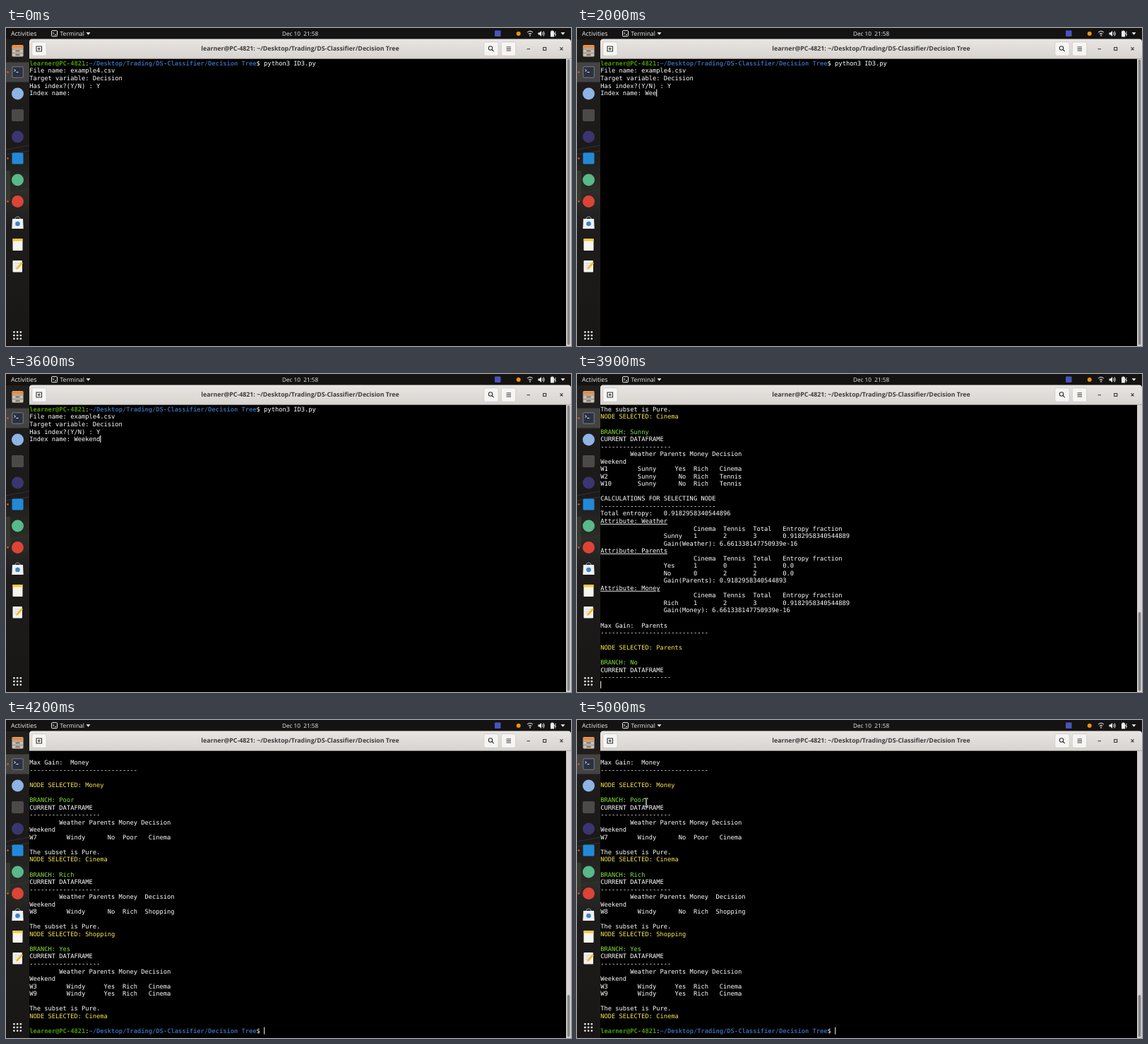
An HTML page for the animation above (5100 ms loop, 800 by 450 pixels).

```html
<!DOCTYPE html>
<html lang="en">
<head>
<meta charset="utf-8">
<title>Terminal session</title>
<style>
  html, body { margin: 0; width: 100%; height: 100%; overflow: hidden; background: #000; }
  svg { display: block; width: 800px; height: 450px; }
  text { text-rendering: geometricPrecision; white-space: pre; }
  .ui { font: 8.5px "Open Sans", "Noto Sans", sans-serif; fill: #eee; }
  .activities { font-size: 8.9px; }
  .clock { font-size: 8.2px; }
  .title { font-size: 8.8px; font-weight: 700; fill: #3d3d3d; text-anchor: middle; }
  .screen { font: 8.755px "DejaVu Sans Mono", monospace; fill: #fff; }
  .user { fill: #4e9a06; font-weight: 700; }
  .path { fill: #3465a4; font-weight: 700; }
  .node { fill: #fce94f; }
  .branch { fill: #8ae234; }
  .attribute { text-decoration: underline; }
  .button { fill: #f6f5f3; stroke: #cbc5bf; stroke-width: .7; }
  .line { fill: none; stroke: #333; stroke-width: 1.1; }
  .light { fill: none; stroke: #eee; stroke-width: 1; }
</style>
</head>
<body>
<svg viewBox="0 0 800 450" xmlns="http://www.w3.org/2000/svg">
  <defs>
    <linearGradient id="bar" x2="0" y2="1">
      <stop stop-color="#e8e5e2"/><stop offset="1" stop-color="#d8d4d0"/>
    </linearGradient>
    <linearGradient id="dock" x2="0" y2="1">
      <stop stop-color="#211f1e"/><stop offset=".35" stop-color="#1b1a19"/>
      <stop offset=".5" stop-color="#2c2c28"/><stop offset=".62" stop-color="#1d1c1b"/>
      <stop offset="1" stop-color="#181716"/>
    </linearGradient>
  </defs>
  <rect width="800" height="450"/>

  <g id="dockbar">
    <rect y="15.500" width="33" height="434.500" fill="url(#dock)"/>
    <path d="M0 172L33 166M0 179L33 174M0 236L33 228" stroke="#33322f" fill="none"/>
    <path d="M0 202h6v43H0z" fill="#35372d"/>
    <rect y="48.500" width="33" height="28" fill="#454341"/>
    <g id="running" fill="#e95420">
      <circle cx="2.500" cy="62.500" r="1.300"/><circle cx="2.500" cy="184.500" r="1.300"/><circle cx="2.500" cy="245.500" r="1.300"/>
    </g>
    <rect x="8.500" y="24" width="16" height="16.500" rx="1.500" fill="#c9c0b4"/>
    <path d="M9 24.500h15l.5 4h-16z" fill="#e98a3c"/>
    <path d="M9 30h15M9 35.500h15" stroke="#81776c" stroke-width=".8"/>
    <path d="M13.500 32.500h6M13.500 38h6" stroke="#5f574f" stroke-width="1.300"/>
    <rect x="8.800" y="54.800" width="15.400" height="15.400" rx="1.200" fill="#293142" stroke="#8b9098" stroke-width=".8"/>
    <path d="M11.500 58.500l2 1.500-2 1.500M14.500 62.500h3" class="light"/>
    <circle cx="16.500" cy="93" r="8.500" fill="#8fb4e3"/>
    <rect x="8" y="115" width="17" height="17" rx="2" fill="#4c4a48"/>
    <circle cx="16.500" cy="154" r="8.500" fill="#3b3570"/>
    <rect x="8.500" y="176.500" width="16" height="16" rx="1.500" fill="#2389d7"/>
    <circle cx="16.500" cy="215" r="8.500" fill="#58b98a"/>
    <circle cx="16.500" cy="245.500" r="8.500" fill="#db4437"/>
    <path d="M13 271v-2q3.500-4 7 0v2" fill="none" stroke="#8aa9c8"/>
    <path d="M9 270h15l.7 14H8.300z" fill="#edf0f3"/>
    <circle cx="16.500" cy="277" r="3.300" fill="#3f83c5"/>
    <rect x="9.500" y="298" width="14" height="17" rx="1" fill="#f7f5ed"/>
    <path d="M9.500 298h14v3.500h-14z" fill="#f3c83d"/>
    <rect x="9.500" y="329" width="13.500" height="16.500" rx="1" fill="#f4f3ef"/>
    <path d="M12 333h8M12 336h7M12 339h5" stroke="#bbb" stroke-width=".7"/>
    <path d="M14 342l1-3 7-8 2 2-7 8z" fill="#efbd2c"/>
    <g id="apps" fill="#eee"></g>
  </g>

  <g id="topbar">
    <rect width="800" height="15.700" fill="#151312"/>
    <g class="ui">
      <text class="activities" x="7" y="11">Activities</text>
      <text x="76.500" y="11">Terminal</text>
      <text class="clock" x="391" y="11">Dec 10  21:58</text>
    </g>
    <rect x="64.500" y="3.700" width="8" height="8" rx="1" class="light"/>
    <path d="M66.300 6l1.500 1.500-1.500 1.500M69 9.500h2" class="light"/>
    <path d="M113.500 6.300h6l-3 3.500zM785.500 6.300h6l-3 3.500z" fill="#eee"/>
    <rect x="692" y="3.500" width="8.500" height="8.500" rx="1" fill="#4b53bc"/>
    <circle cx="725.700" cy="8" r="3" fill="#f5900c"/>
    <path d="M738 6.200q4-3.600 8 0M739.700 8.300q2.300-2 4.600 0M742 8.500v3.500" class="light"/>
    <path d="M753.500 6.500h2l2.500-2.500v8l-2.500-2.500h-2z" fill="#eee"/>
    <path d="M759.500 6q1.500 2 0 4M761 4.500q2.500 3.500 0 7" class="light"/>
    <path d="M771 4.500h1.500v-1h2v1h1.500v8h-5z" fill="#eee"/>
    <path d="M778.500 5l-2 3.500h2l-1 3" class="light"/>
  </g>

  <g id="titlebar">
    <path d="M33 43.500V19.500q0-4 4-4h759q4 0 4 4v24z" fill="url(#bar)"/>
    <path d="M33 43.200h767" stroke="#b9b3ad" stroke-width=".7"/>
    <text class="ui title" x="416.500" y="32.300">learner@PC-4821: ~/Desktop/Trading/DS-Classifier/Decision Tree</text>
    <rect class="button" x="36.800" y="19.700" width="20.400" height="19.600" rx="2.500"/>
    <rect class="button" x="676.800" y="19.700" width="20.400" height="19.600" rx="2.500"/>
    <rect class="button" x="701.300" y="19.700" width="20.400" height="19.600" rx="2.500"/>
    <path class="line" d="M43 26h7.500v7H43zM46.700 27.500v4M44.700 29.500h4M708.500 27h6.500M708.500 29.500h6.500M708.500 32h6.500"/>
    <circle class="line" cx="686" cy="28.500" r="2.700"/>
    <path class="line" d="M688 30.500l2.700 2.700M737.500 29.800h4.500M760.700 27.500h4v4h-4zM784.500 27.300l4 4M788.500 27.300l-4 4"/>
  </g>

  <rect x="793" y="43.500" width="7" height="406.500" fill="#d6d3d0"/>
  <rect id="thumb" x="794.700" width="3.700" rx="1.800" fill="#858788"/>
  <g id="screens"></g>
  <rect id="cursor" width="1" height="10.200" fill="#fff"/>
  <g id="pointer" fill="none">
    <path id="beam" d="M-2.500-5.500Q0-5.500 0-4Q0-5.500 2.500-5.500M0-4V4M-2.500 5.500Q0 5.500 0 4Q0 5.500 2.500 5.500" stroke="#ddd" stroke-width="2"/>
    <path d="M-2.500-5.500Q0-5.500 0-4Q0-5.500 2.500-5.500M0-4V4M-2.500 5.500Q0 5.500 0 4Q0 5.500 2.500 5.500" stroke="#222" stroke-width=".7"/>
  </g>
</svg>
<script>
const LOOP = 5100, LEFT = 33.2, TOP = 44.6, CELL = 5.271, ROW = 10.54;
const $ = id => document.getElementById(id);
const PROMPT = '<tspan class="user">learner@PC-4821</tspan>:<tspan class="path">~/Desktop/Trading/DS-Classifier/Decision Tree</tspan>$ ';
const PROMPT_LENGTH = 63;

// Weather, Parents, Money and Decision of each weekend
const WEEKENDS = `Sunny Yes Rich Cinema,Sunny No Rich Tennis,Windy Yes Rich Cinema,Rainy Yes Poor Cinema,Rainy No Rich Stay-in,Rainy Yes Poor Cinema,Windy No Poor Cinema,Windy No Rich Shopping,Windy Yes Rich Cinema,Sunny No Rich Tennis`
  .split(',').map(row => row.split(' '));

const rule = n => '-'.repeat(n);
const tabs = cells => ' '.repeat(17) + cells.map(c => c.padEnd(c.length < 8 ? 8 : 16)).join('');

function dataFrame(...ids) {
  const rows = ids.map(id => WEEKENDS[id - 1]);
  const last = rows.some(r => r[3] === 'Shopping') ? 9 : 8;
  const line = (id, [weather, parents, money, decision]) =>
    [id.padEnd(7), weather.padStart(7), parents.padStart(7), money.padStart(5), decision.padStart(last)].join(' ');
  return ['CURRENT DATAFRAME', rule(19), line('', ['Weather', 'Parents', 'Money', 'Decision']),
    'Weekend', ...rows.map((r, i) => line('W' + ids[i], r))];
}
const branch = (name, ...ids) => ['BRANCH: ' + name, ...dataFrame(...ids)];
const pure = node => ['', 'The subset is Pure.', 'NODE SELECTED: ' + node, ''];
const chosen = node => ['', 'Max Gain:  ' + node, rule(29), '', 'NODE SELECTED: ' + node, ''];
const calculations = total => ['', 'CALCULATIONS FOR SELECTING NODE', rule(31), 'Total entropy:   ' + total];
const attribute = (name, gain, classes, ...rows) => ['Attribute: ' + name,
  tabs(['', ...classes.split(' '), 'Total', 'Entropy fraction']),
  ...rows.map(r => tabs(r.split(' '))), `${' '.repeat(17)}Gain(${name}): ${gain}`];

const ALL = 'Cinema Tennis Stay-in Shopping', PAIR = 'Cinema Tennis', TINY = '6.661338147750939e-16';
const input = [PROMPT + 'python3 ID3.py', 'File name: example4.csv', 'Target variable: Decision',
  'Has index?(Y/N) : Y', 'Index name: '];
const rootNode = [
  ...dataFrame(1, 2, 3, 4, 5, 6, 7, 8, 9, 10),
  ...calculations('1.5709505944546684'),
  ...attribute('Weather', '0.6954618442383218', ALL, 'Rainy 2 0 1 0 3 0.9182958340544896',
    'Sunny 1 2 0 0 3 0.9182958340544896', 'Windy 3 0 0 1 4 0.8112781244591328'),
  ...attribute('Parents', '0.6099865470109874', ALL, 'Yes 5 0 0 0 5 0.0', 'No 1 2 1 1 5 1.9219280948873623'),
  ...attribute('Money', '0.2812908992306925', ALL, 'Rich 3 2 1 1 7 1.8423709931771084', 'Poor 3 0 0 0 3 0.0')
];
const sunnyNode = [
  ...pure('Cinema').slice(1),
  ...branch('Sunny', 1, 2, 10),
  ...calculations('0.9182958340544896'),
  ...attribute('Weather', TINY, PAIR, 'Sunny 1 2 3 0.9182958340544889'),
  ...attribute('Parents', '0.9182958340544893', PAIR, 'Yes 1 0 1 0.0', 'No 0 2 2 0.0'),
  ...attribute('Money', TINY, PAIR, 'Rich 1 2 3 0.9182958340544889'),
  ...chosen('Parents'),
  ...branch('No').slice(0, 3)
];
const windyNode = [
  ...branch('No', 2, 10), ...pure('Tennis'),
  ...branch('Yes', 1), ...pure('Cinema'),
  ...branch('Windy', 3, 7, 8, 9),
  ...calculations('0.8112781244591328'),
  ...attribute('Weather', '0.0', 'Cinema Shopping', 'Windy 3 1 4 0.8112781244591328')
];
const finish = [
  ...chosen('Money'),
  ...branch('Poor', 7), ...pure('Cinema'),
  ...branch('Rich', 8), ...pure('Shopping'),
  ...branch('Yes', 3, 9), ...pure('Cinema'), PROMPT
];

const screens = [
  { from: 0, lines: input, thumb: 44.5 },
  { from: 3800, lines: rootNode.slice(-37), thumb: 90 },
  { from: 3900, lines: sunnyNode, thumb: 337 },
  { from: 4000, lines: windyNode.slice(0, 37), thumb: 358 },
  { from: 4200, lines: finish, thumb: 389 }
];

function styleOf(line) {
  const word = line.match(/^(NODE|BRANCH|Attribute)/);
  return word ? word[0].toLowerCase() : '';
}
$('screens').innerHTML = screens.map(s => '<g class="screen">' + s.lines.map((line, i) =>
  `<text class="${styleOf(line)}" x="${LEFT}" y="${(TOP + 8.3 + i * ROW).toFixed(2)}">${line}</text>`).join('') + '</g>').join('');
const groups = [...$('screens').children];
const entry = groups[0].lastChild;

for (let i = 0; i < 9; i++)
  $('apps').innerHTML += `<rect x="${10.2 + i % 3 * 4.7}" y="${429 + Math.floor(i / 3) * 4.7}" width="2.500" height="2.500" rx=".8"/>`;

const KEY_TIMES = [1500, 1700, 2000, 2500, 2900, 3100, 3300];
const CURSOR_OFF = [[0, 600], [1300, 1500], [4400, 5000]];

function placeCursor(index, typed) {
  let column = 0, row = 37;
  if (index === 0) { column = 12 + typed; row = 4; }
  if (index === 4) column = PROMPT_LENGTH;
  $('cursor').setAttribute('x', LEFT + column * CELL);
  $('cursor').setAttribute('y', TOP + row * ROW);
}

function draw(t) {
  const index = screens.findLastIndex(s => t >= s.from);
  const typed = KEY_TIMES.filter(k => t >= k).length;
  groups.forEach((g, i) => g.setAttribute('visibility', i === index ? 'visible' : 'hidden'));
  entry.textContent = 'Index name: ' + 'Weekend'.slice(0, typed);

  const { thumb } = screens[index];
  $('thumb').setAttribute('y', thumb);
  $('thumb').setAttribute('height', 448.5 - thumb);

  placeCursor(index, typed);
  const off = CURSOR_OFF.some(([a, b]) => t >= a && t < b);
  $('cursor').setAttribute('visibility', off ? 'hidden' : 'visible');

  const away = (1 - Math.min(1, Math.max(0, (t - 4400) / 600))) ** 2;
  $('pointer').setAttribute('transform', `translate(${98 + 90 * away} ${116.5 + 70 * away})`);
  $('pointer').setAttribute('visibility', t >= 4400 ? 'visible' : 'hidden');
}

function tick() {
  draw(Math.floor(performance.now() % LOOP / 100) * 100);
  requestAnimationFrame(tick);
}
tick();
</script>
</body>
</html>
```
